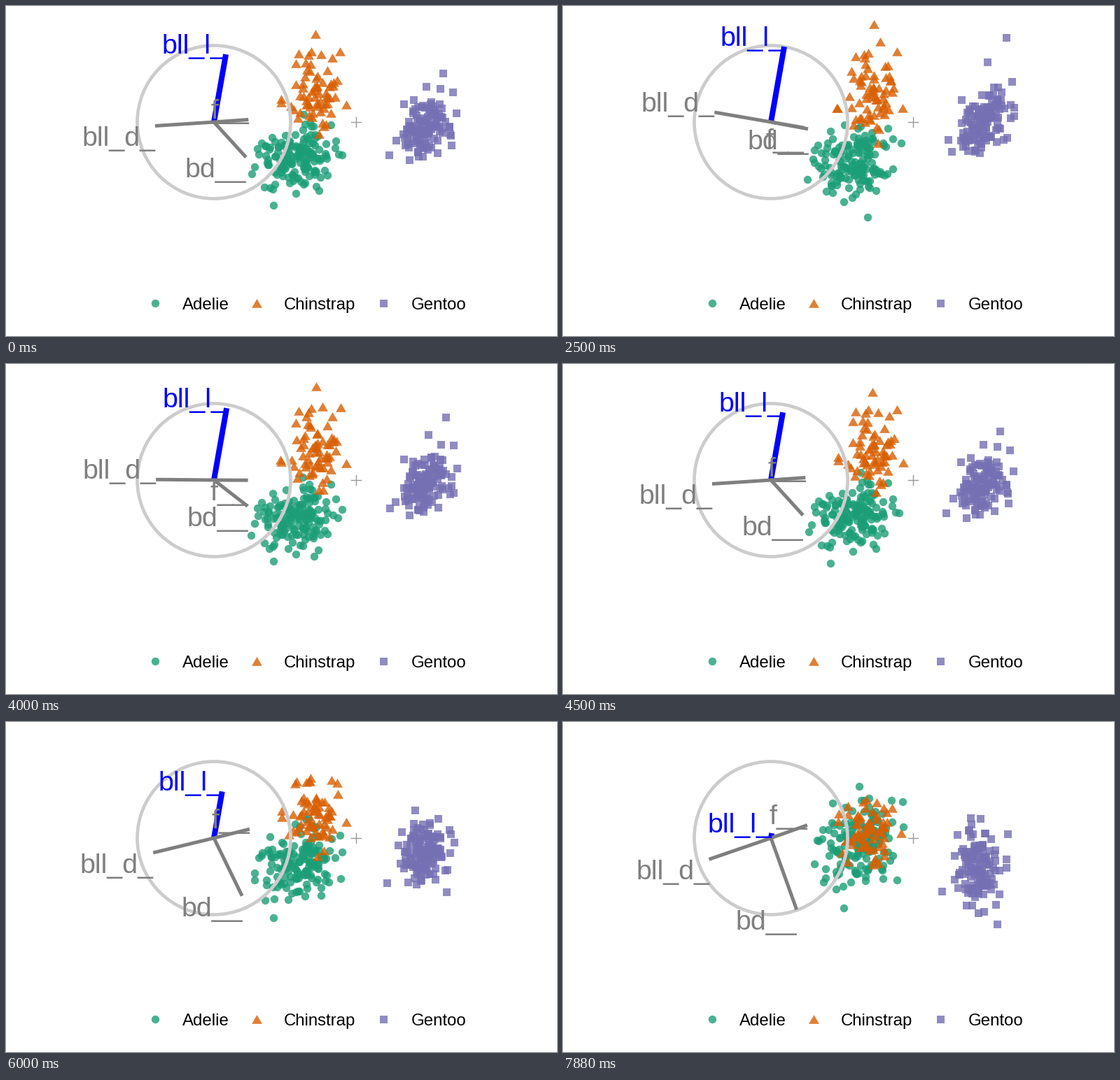
Animation, 787 px wide and 472 px high, one loop 8 s. Source, as a matplotlib script:

```python
import numpy as np
import matplotlib.pyplot as plt
from matplotlib.animation import FuncAnimation

W, H, DPI, STEP, LOOP = 787, 472, 100, 20, 8000
PT = 72 / DPI
GREEN, ORANGE, PURPLE = "#1b9e77", "#d95f02", "#7570b3"
GREY, BLUE = "#7f7f7f", "#0000ff"

plt.rcParams["font.family"] = ["Liberation Sans", "DejaVu Sans"]
rng = np.random.default_rng(12)

# Radial tour: one variable turns fully into the plane, then out of it,
# in equal steps of angle with a pause at full contribution.
TIMES = [0, 1500, 2000, 2500, *range(3500, 7501, 500), 7880]
PHIS = np.radians(0.3 + 8.6 * np.abs(np.arange(len(TIMES)) - 3))

THETA = np.radians(80)
RADIAL = np.array([np.cos(THETA), -np.sin(THETA)])
ACROSS = np.array([np.sin(THETA), np.cos(THETA)])
HUB = np.array([297, 166])
ORIGIN = np.array([500, 166]) - 19 * RADIAL


def project(pts, phi, center):
    """Columns: fixed part, radial part at 0 degrees, radial part at 90 degrees."""
    w, a, b = np.asarray(pts, float).T
    r = a * np.cos(phi) + b * np.sin(phi)
    return center + np.outer(w, ACROSS) + np.outer(r, RADIAL)


def cloud(n, mean, sd, wa, wb, ab, extremes):
    """Correlated bell-shaped cloud plus a few points that define its outline."""
    corr = np.array([[1, wa, wb], [wa, 1, ab], [wb, ab, 1]])
    z = rng.uniform(-1, 1, (3, n - len(extremes), 3)).sum(axis=0)
    core = np.array(mean) + z @ np.linalg.cholesky(corr).T * np.array(sd)
    return np.vstack([core, extremes])


adelie = cloud(151, (-73, -55, 6), (25, 23, 31), 0.15, 0.05, -0.3,
               [(-40, -127, 75), (-96, -100, -66), (-132, -58, -38), (-12, -13, -43)])
gentoo = cloud(123, (98, 35, -6), (17, 24, 31), 0.4, -0.35, -0.35,
               [(110, 162, -81), (90, 122, -52), (54, 3, -49), (140, 53, -85)])
chinstrap = cloud(68, (-62, 54, 8), (19, 29, 26), 0.1, 0.1, -0.1,
                  [(-79, 147, 2), (-66, 124, -13), (-18, 36, 21), (-110, 20, 23)])

AXES = [("bll_l_", (0, 109.5, 0), BLUE, 8),
        ("bll_d_", (-81.8, 0, -45.4), GREY, 5),
        ("f__", (47.9, 0, 27.3), GREY, 5),
        ("bd__", (53.9, 0, -94.6), GREY, 5)]

TRIANGLE = np.array([(0, 6.5), (-7.4, -6.3), (7.4, -6.3)])
SPECIES = [("Adelie", adelie, GREEN, "o", 11.4, 213, 251.5),
           ("Gentoo", gentoo, PURPLE, "s", 11, 539, 579),
           ("Chinstrap", chinstrap, ORANGE, TRIANGLE, 14.8, 357.5, 396.5)]

fig = plt.figure(figsize=(W / DPI, H / DPI), dpi=DPI, facecolor="white")
ax = fig.add_axes([0, 0, 1, 1])
ax.set(xlim=(0, W), ylim=(H, 0))
ax.axis("off")


def marks(xy, color, marker, size):
    x, y = np.transpose(xy)
    return ax.scatter(x, y, s=(size * PT) ** 2, marker=marker, color=color,
                      alpha=0.8, linewidths=0, zorder=2, snap=False)


def label(x, y, text, px, color, ha):
    return ax.text(x, y, text, fontsize=px * PT, color=color, ha=ha,
                   va="baseline", zorder=6)


clouds = []
for name, pts, color, marker, size, key_x, text_x in SPECIES:
    clouds.append((marks(project(pts, PHIS[0], ORIGIN), color, marker, size), pts))
    marks([(key_x, 424.5)], color, marker, size)
    label(text_x, 434, name, 24, "black", "left")

for dx, dy in [(7, 0), (0, 7)]:
    ax.plot([500 - dx, 500 + dx], [166 - dy, 166 + dy],
            color="#999999", lw=1.4 * PT, zorder=3)
ax.add_patch(plt.Circle(HUB, 109.5, fill=False, ec="#cccccc", lw=4.7 * PT, zorder=4))

arms = []
for name, vec, color, width in AXES:
    line, = ax.plot([], [], color=color, lw=width * PT,
                    solid_capstyle="butt", zorder=5)
    arms.append((line, label(0, 0, name, 39.4, color, "right"), vec))


def draw(i):
    phi = PHIS[np.searchsorted(TIMES, i * STEP, side="right") - 1]
    for art, pts in clouds:
        art.set_offsets(project(pts, phi, ORIGIN))
    for line, text, vec in arms:
        x, y = project([vec], phi, HUB)[0]
        line.set_data([HUB[0], x], [HUB[1], y])
        # Labels sit above tips that point up and hang below the others.
        text.set_position((x + 0.5, y - 1.5 if y < HUB[1] else y + 29))
    return [c[0] for c in clouds] + [a for arm in arms for a in arm[:2]]


anim = FuncAnimation(fig, draw, frames=LOOP // STEP, interval=STEP,
                     repeat=True, repeat_delay=0)
plt.show()
```
